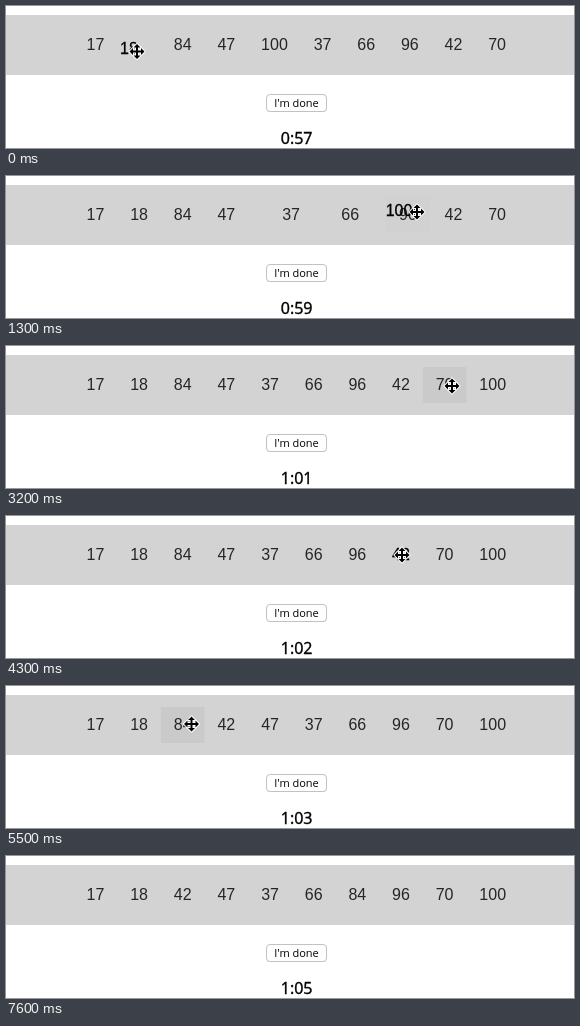
Recreate the animation shown at these times as an HTML page. Size 568 by 142 pixels, loop 8200 ms.

```html
<!DOCTYPE html>
<html lang="en">
<head>
<meta charset="utf-8">
<title>Sort the numbers</title>
<style>
  html, body { margin: 0; width: 100%; height: 100%; overflow: hidden; background: #fff; }
  svg { display: block; width: 568px; height: 142px; }
  text { text-anchor: middle; }
  .num { font: 16px "Liberation Sans", Arial, sans-serif; fill: #252525; }
  .ghost { fill: #000; stroke: #000; stroke-width: .3px; }
  .label { font: 11px "Open Sans", sans-serif; fill: #000; }
  .clock { font: 16px "Open Sans", sans-serif; fill: #000; stroke: #000; stroke-width: .4px; }
  .cursor { fill: #000; stroke: #fff; stroke-width: 2px; stroke-linejoin: round; paint-order: stroke; }
</style>
</head>
<body>
<svg viewBox="0 0 568 142">
  <rect width="568" height="142" fill="#fff"/>
  <rect y="9" width="568" height="60" fill="#d3d3d3"/>
  <rect id="hover" y="21" height="36"/>
  <g id="items"></g>
  <rect x="260.5" y="89" width="60" height="17" rx="3.5" fill="#d0d0d0"/>
  <rect x="260.5" y="88.5" width="60" height="17" rx="3.5" fill="#fff" stroke="#c2c2c2"/>
  <text class="label" x="290.5" y="101">I'm done</text>
  <text class="clock" id="clock" x="290.6" y="138"></text>
  <path class="cursor" id="move" d="M0-7.5L3.5-4H1V-1H4V-3.5L7.5 0L4 3.5V1H1V4H3.5L0 7.5L-3.5 4H-1V1H-4V3.5L-7.5 0L-4-3.5V-1H-1V-4H-3.5Z"/>
  <path class="cursor" id="arrow" d="M0 0V15L3.5 11.8L6 17.5L8.3 16.5L5.8 11H10.5Z"/>
</svg>
<script>
const LOOP = 8200, STEP = 100, SLIDE = 300, PITCH = 43.65, REST_Y = 39, BASE = 5;
const $ = id => document.getElementById(id);
const width = n => n > 99 ? 52.5 : PITCH;
const ease = k => { k = Math.min(1, Math.max(0, k)); return k * k * (3 - 2 * k); };

// Pointer glides: from, to, x, y
const home = [131, 45.5];
const glides = [
  [0, 200, 136, 39], [200, 600, 289, 39], [1050, 1300, 411, 36],
  [1300, 1850, 521, 38], [1900, 2200, 504.5, 39], [2600, 3200, 446, 40],
  [3700, 4100, 396, 39], [4300, 4600, 219, 38], [5250, 5500, 185.5, 38],
  [5550, 6250, 365, 34], [6850, 7500, 304, 90]
];

function pointer(t) {
  let [x, y] = home;
  for (const [from, to, gx, gy] of glides) {
    const k = ease((t - from) / (to - from));
    x += (gx - x) * k;
    y += (gy - y) * k;
  }
  return [x, y];
}

let edge = 67.6;
const items = [17, 18, 84, 47, 100, 37, 66, 96, 42, 70].map(n => {
  const el = document.createElementNS("http://www.w3.org/2000/svg", "text");
  el.textContent = n;
  $("items").append(el);
  const x = edge + width(n) / 2;
  edge += width(n);
  return { n, x, el };
});

const drags = [
  { n: 18, from: 0, to: 150, grip: 8, lift: 3 },
  { n: 100, from: 950, to: 2350, grip: 20, lift: 1 },
  { n: 42, from: 4250, to: 5250, grip: 1, lift: 0 },
  { n: 84, from: 5550, to: 6650, grip: 9, lift: 0.5 }
].map(d => ({ ...d, swaps: [] }));

function place({ n, x }, t) {
  for (const d of drags) {
    for (const s of d.swaps) {
      if (n === s.n) x -= s.dir * width(d.n) * ease((t - s.at) / SLIDE);
      if (n === d.n && t >= s.at) x += s.dir * width(s.n);
    }
  }
  return x;
}

// A neighbour gives way once the pointer passes its centre.
for (const d of drags) {
  const own = place(items.find(i => i.n === d.n), d.from);
  const rest = items.filter(i => i.n !== d.n).map(i => ({ n: i.n, x: place(i, d.from) }));
  for (let at = d.from; at < d.to; at += 5) {
    const px = pointer(at)[0];
    for (const { n, x } of rest) {
      const dir = Math.sign(x - own);
      const passed = (px - x) * dir > 0;
      if (passed && !d.swaps.some(s => s.n === n)) d.swaps.push({ n, dir, at });
    }
  }
}

const show = (el, on) => el.setAttribute("visibility", on ? "visible" : "hidden");

function draw(t) {
  const [px, py] = pointer(t);
  const drag = drags.find(d => t >= d.from && t < d.to);
  const present = t < 7600, inBar = py < 57;
  let over = null;

  for (const item of items) {
    const held = drag && drag.n === item.n, w = width(item.n);
    let x = place(item, t), y = REST_Y;
    if (held) {
      // The grip tightens as the drag goes on.
      const k = (t - drag.from) / (drag.to - drag.from);
      x = px - drag.grip * (1 - 0.4 * k);
      y = py - drag.lift;
      $("items").append(item.el);
    } else if (present && inBar && Math.abs(px - x) < w / 2) {
      over = { x: x - w / 2, w };
    }
    item.el.setAttribute("class", held ? "num ghost" : "num");
    item.el.setAttribute("x", x);
    item.el.setAttribute("y", y + BASE);
  }

  show($("hover"), over);
  if (over) {
    $("hover").setAttribute("x", over.x);
    $("hover").setAttribute("width", over.w);
    $("hover").setAttribute("fill", drag ? "#d1d1d1" : "#cacaca");
  }

  show($("move"), present && inBar);
  show($("arrow"), present && !inBar);
  $(inBar ? "move" : "arrow").setAttribute("transform", `translate(${px} ${py})`);

  const s = 57 + Math.floor((t + 800) / 1000);
  $("clock").textContent = Math.floor(s / 60) + ":" + String(s % 60).padStart(2, "0");
}

const began = performance.now();
function tick() {
  const t = (performance.now() - began) % LOOP;
  draw(Math.floor(t / STEP) * STEP);
  requestAnimationFrame(tick);
}
tick();
</script>
</body>
</html>
```
